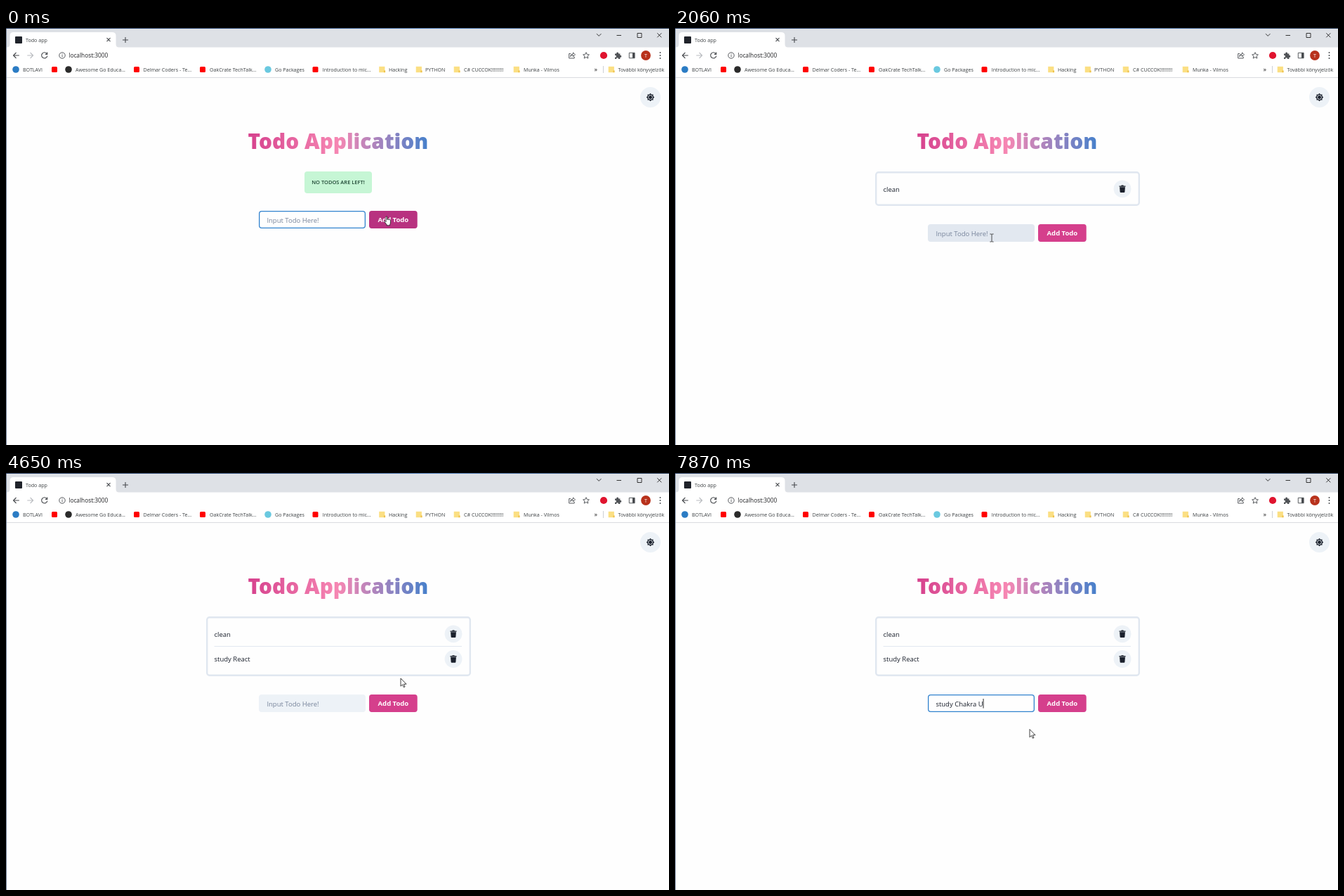
Recreate the animation shown at these times as an HTML page. Size 944 by 593 pixels, loop 8 s.

```html
<!DOCTYPE html>
<html lang="en">
<head>
<meta charset="utf-8">
<title>Todo app</title>
<style>
  html, body { margin: 0; width: 100%; height: 100%; overflow: hidden; background: #fff; }
  svg { display: block; }
  text { font: 9.5px "Open Sans", "Noto Sans", sans-serif; fill: #1a202c; white-space: pre; }
  .ui text { font-size: 7.1px; fill: #3c4043; }
  .ui text.url { font-size: 8.3px; fill: #202124; }
  .line { fill: none; stroke: #46494d; stroke-width: 1.1; }
  .title { font-size: 29.8px; font-weight: 800; fill: url(#heading); }
  .alert { font-size: 7.5px; font-weight: 600; fill: #1c4532; }
  .label { font-weight: 700; fill: #fff; }
  .pointer path { fill: #fff; stroke: #111; stroke-width: .8; stroke-linejoin: round; }
  .pointer .beam { fill: none; stroke: #222; }
</style>
</head>
<body>
<svg width="944" height="593" viewBox="0 0 944 593">
  <defs>
    <linearGradient id="heading" gradientUnits="userSpaceOnUse" x1="340" x2="606">
      <stop stop-color="#d53f8c"/><stop offset=".5" stop-color="#f687b3"/><stop offset="1" stop-color="#3f80cc"/>
    </linearGradient>
    <linearGradient id="desk">
      <stop stop-color="#26395c"/><stop offset=".45" stop-color="#2c4a78"/>
      <stop offset=".65" stop-color="#4a78b4"/><stop offset="1" stop-color="#22344f"/>
    </linearGradient>
    <g id="folder"><path d="M-4.3-4.2h8.2v8.4h-8.2z" fill="#fbdf83"/><path d="M2.4 1.4h2.2v2.8H2.4z" fill="#eec24c"/></g>
    <g id="trash">
      <circle r="12.4" fill="#edf2f7"/>
      <path d="M-4.5-4.4h2.6l.6-.9h2.6l.6.9h2.6v1.3h-9zM-3.9-2.5h7.8l-.5 6.7q-.1 1-1 1h-4.8q-.9 0-1-1z" fill="#1a202c"/>
    </g>
  </defs>

  <rect width="944" height="593" fill="#fefefe"/>
  <g class="ui">
    <rect y="1" width="944" height="27" fill="#dee1e6"/>
    <rect width="944" height="1" fill="url(#desk)"/>
    <path d="M1 27.5q4.5 0 4.5-4.5V11q0-5 5-5H151q5.5 0 5.5 5V23q0 4.5 4.5 4.5H944V70H1z" fill="#fff"/>
    <path d="M0 70.5H944" stroke="#dadce0"/>
    <path d="M.5 1V593" stroke="#77849b"/>
    <rect x="13" y="12" width="10" height="10" rx="1" fill="#20232a"/>
    <text x="28" y="19.5">Todo app</text>
    <g class="line">
      <path d="M143.5 14.2l5 5m0-5l-5 5M166 17h8m-4-4v8"/>
      <path d="M841 8.2l3.2 3.2 3.2-3.2M869.5 10.5h6.5M899 7.5h6v6h-6zM927.3 7.3l6 6m0-6l-6 6" stroke="#222" stroke-width=".9"/>
      <path d="M18.8 39H10.5m4-4l-4 4 4 4"/>
      <path d="M30.3 39h8.3m-4-4l4 4-4 4" stroke="#babcc0"/>
      <path d="M58 36.3a4.1 4.1 0 1 0 .8 3.4M58.7 34.5v2.9h-2.9"/>
      <g stroke-width=".9">
        <circle cx="80" cy="39" r="4.2"/><path d="M80 38.4v2.8M80 36.5v1"/>
        <path d="M804 36.5h-2.3v6.5h7.5v-2.3M803.5 40.5q.3-3.5 4-3.6V35l3 2.8-3 2.8v-1.9q-2.6 0-4 1.8z"/>
        <path d="M826 34.7l1.3 2.9 3.1.3-2.3 2.1.7 3.1-2.8-1.6-2.8 1.6.7-3.1-2.3-2.1 3.1-.3z"/>
        <path d="M887.3 35.3h7.8v7.5h-7.8z"/>
      </g>
      <path d="M850.5 54v10" stroke="#cfd2d6"/>
    </g>
    <path d="M892 35.3h3.1v7.5H892z" fill="#46494d"/>
    <circle cx="851" cy="39" r="5.1" fill="#e0142f"/>
    <path d="M867 36.5h2.2a1.5 1.5 0 1 1 2.9 0h2.3v2.3a1.5 1.5 0 1 1 0 2.9V44h-2.5a1.4 1.4 0 1 0-2.7 0H867v-2.5a1.4 1.4 0 1 0 0-2.6z" fill="#505357"/>
    <circle cx="911" cy="39" r="6.9" fill="#b8321c"/>
    <text x="911" y="41.7" text-anchor="middle" style="fill:#fff">T</text>
    <path d="M931.5 35v0m0 4v0m0 4v0" stroke="#46494d" stroke-width="1.9" stroke-linecap="round"/>
    <text class="url" x="89.3" y="42">localhost:3000</text>
    <text x="837.5" y="62" style="font-size:9px;fill:#222">»</text>
    <g id="bookmarks"></g>
  </g>

  <circle cx="917.5" cy="98.5" r="14.5" fill="#edf2f7"/>
  <path id="sun" fill="#1a202c"/>
  <circle cx="917.5" cy="98.5" r="2.9" fill="none" stroke="#edf2f7" stroke-width=".9"/>

  <text class="title" x="344.6" y="172">Todo Application</text>

  <g id="empty">
    <rect x="425" y="204" width="96" height="31" rx="4" fill="#c6f6d5"/>
    <text class="alert" x="473" y="222.4" text-anchor="middle">NO TODOS ARE LEFT!</text>
  </g>
  <g id="list">
    <rect id="frame" x="286.2" y="205.2" width="374.6" rx="3.5" fill="none" stroke="#e0e7f0" stroke-width="2.4"/>
    <text x="296.5" y="232.5">clean</text>
    <use href="#trash" x="637" y="228.8"/>
    <g id="second">
      <path d="M296.5 246.5H649" stroke="#e2e8f0"/>
      <text x="296.5" y="268.3">study React</text>
      <use href="#trash" x="637" y="264.5"/>
    </g>
  </g>

  <g id="form">
    <rect id="field" x="360.65" y="260.65" width="150.7" height="23.7" rx="3.4" stroke-width="1.3"/>
    <text id="value" x="371.4" y="277"></text>
    <path id="caret" d="M0 266v13.5" stroke="#111" stroke-width=".9"/>
    <rect id="button" x="517" y="260" width="68.7" height="25" rx="3.7"/>
    <text class="label" x="551.4" y="276.4" text-anchor="middle">Add Todo</text>
  </g>

  <g class="pointer" id="pointer">
    <path id="hand" d="M3 7.5V1.3a.9.9 0 0 1 1.8 0V5a.8.8 0 0 1 1.6.2a.8.8 0 0 1 1.6.3a.75.75 0 0 1 1.4.5V9.5Q9.3 11 8.5 12v1.3H4V12L.9 8.2Q.4 7.2 1.4 7 2.2 7 3 8.2z"/>
    <path id="arrow" d="M0 0v11.2l2.6-2.4 1.7 3.9 1.7-.7-1.6-3.8H8z"/>
    <path id="beam" class="beam" d="M-2.6-5.5h1.8L0-4.8.8-5.5h1.8M0-4.8v9.6M-2.6 5.5h1.8L0 4.8l.8.7h1.8"/>
  </g>
</svg>

<script>
const $ = id => document.getElementById(id);
const LOOP = 8000;

const disc = (x, color) => `<circle cx="${x}" cy="59" r="4.8" fill="${color}"/>`;
const video = x => `<rect x="${x - 4}" y="55" width="8" height="8" rx="1.5" fill="#f00"/>`;
const folder = x => `<use href="#folder" x="${x}" y="59"/>`;
const links = [
  [disc(14, '#2b7cc4'), 24, 'BOTLAVI'],
  [video(69), 0, ''],
  [disc(89, '#2b2b2b'), 99, 'Awesome Go Educa...'],
  [video(186), 195.5, 'Delmar Coders - Te...'],
  [video(280), 290, 'OakCrate TechTalk...'],
  [disc(373, '#6ac9e0'), 383, 'Go Packages'],
  [video(440.5), 450.7, 'Introduction to mic...'],
  [folder(535.5), 545, 'Hacking'],
  [folder(588), 597, 'PYTHON'],
  [folder(642), 652, 'C# CUCCOK!!!!!!!!!'],
  [folder(727), 737, 'Munka - Vilmos'],
  [folder(862), 871.5, 'További könyvjelzők'],
];
$('bookmarks').innerHTML = links
  .map(([icon, x, label]) => `${icon}<text x="${x}" y="61.5">${label}</text>`).join('');

const spikes = Array.from({ length: 16 }, (_, i) => {
  const r = i % 2 ? 4.3 : 5.7, a = i * Math.PI / 8;
  return `${917.5 + r * Math.cos(a)} ${98.5 + r * Math.sin(a)}`;
});
$('sun').setAttribute('d', `M${spikes.join('L')}z`);

// Field looks: [fill, border]
const looks = {
  idle: ['#edf2f7', '#edf2f7'],
  hover: ['#e2e8f0', '#e2e8f0'],
  mid: ['#edf1f6', '#a3c4e4'],
  late: ['#fafbfd', '#5297d6'],
  focus: ['#fefefe', '#3182ce'],
};
const PINK = '#d53f8c', DARK = '#b83280';
const type = text => ({ text, caret: 1 });
const move = (kind, x, y) => ({ kind, x, y });

// Each step patches the state left by the steps before it.
const steps = [
  [0, { text: '', caret: 0, items: 0, look: 'focus', btn: DARK, ...move('hand', 538, 267.5) }],
  [640, type('cl')],
  [760, type('clea')],
  [890, type('clean')],
  [1390, { caret: 0, ...move('hand', 546, 273) }],
  [1530, move('hand', 553.3, 278.3)],
  [1780, { text: '', items: 1, look: 'idle' }],
  [1920, { btn: PINK, look: 'hover', ...move('beam', 497, 296) }],
  [2060, move('beam', 451, 298.5)],
  [2190, { look: 'mid', caret: 1 }],
  [2340, { look: 'late' }],
  [2480, { look: 'focus', caret: 0 }],
  [2880, type('s')],
  [3020, type('st')],
  [3160, type('stu')],
  [3290, type('stud')],
  [3430, type('study')],
  [3570, type('study ')],
  [3710, type('study R')],
  [3850, type('study Rea')],
  [3990, type('study Reac')],
  [4130, { text: 'study React', ...move('beam', 480, 298) }],
  [4250, move('hand', 540, 290.5)],
  [4370, { btn: '#c43681', ...move('hand', 558.5, 290.5) }],
  [4650, { text: '', caret: 0, items: 2, look: 'idle', btn: PINK, ...move('arrow', 562, 292) }],
  [4790, move('arrow', 545, 300)],
  [4920, { look: 'hover', ...move('beam', 480, 322) }],
  [5050, move('beam', 430, 331)],
  [5180, move('beam', 414.5, 334.5)],
  [5310, { look: 'mid', caret: 1 }],
  [5430, { look: 'late', ...move('arrow', 475, 389) }],
  [5550, { look: 'focus', ...move('arrow', 505, 364.5) }],
  [5800, { caret: 0 }],
  [6440, { caret: 1 }],
  [6740, type('st')],
  [6880, type('stu')],
  [7020, type('study')],
  [7160, type('study C')],
  [7300, type('study Ch')],
  [7440, type('study Cha')],
  [7580, type('study Chakr')],
  [7720, type('study Chakra ')],
  [7870, type('study Chakra U')],
];
let state = {};
const states = steps.map(([, patch]) => state = { ...state, ...patch });

const show = (id, on) => $(id).style.display = on ? '' : 'none';

function draw(s) {
  show('empty', s.items === 0);
  show('list', s.items > 0);
  show('second', s.items > 1);
  $('frame').setAttribute('height', s.items > 1 ? 82.6 : 46.6);
  $('form').setAttribute('transform', `translate(0 ${[0, 19, 55][s.items]})`);

  const [fill, border] = looks[s.look];
  $('field').setAttribute('fill', fill);
  $('field').setAttribute('stroke', border);
  $('button').setAttribute('fill', s.btn);

  const value = $('value');
  value.textContent = s.text || 'Input Todo Here!';
  value.style.fill = s.text ? '#1a202c' : '#76839a';
  show('caret', s.caret);
  const width = s.text ? value.getComputedTextLength() : 0;
  $('caret').setAttribute('transform', `translate(${371.8 + width} 0)`);

  for (const kind of ['hand', 'arrow', 'beam']) show(kind, kind === s.kind);
  $('pointer').setAttribute('transform', `translate(${s.x} ${s.y})`);
}

const start = performance.now();
let last = -1;
function tick() {
  const t = (performance.now() - start) % LOOP;
  const i = steps.findLastIndex(([at]) => at <= t);
  if (i !== last) draw(states[last = i]);
  requestAnimationFrame(tick);
}
tick();
</script>
</body>
</html>
```
